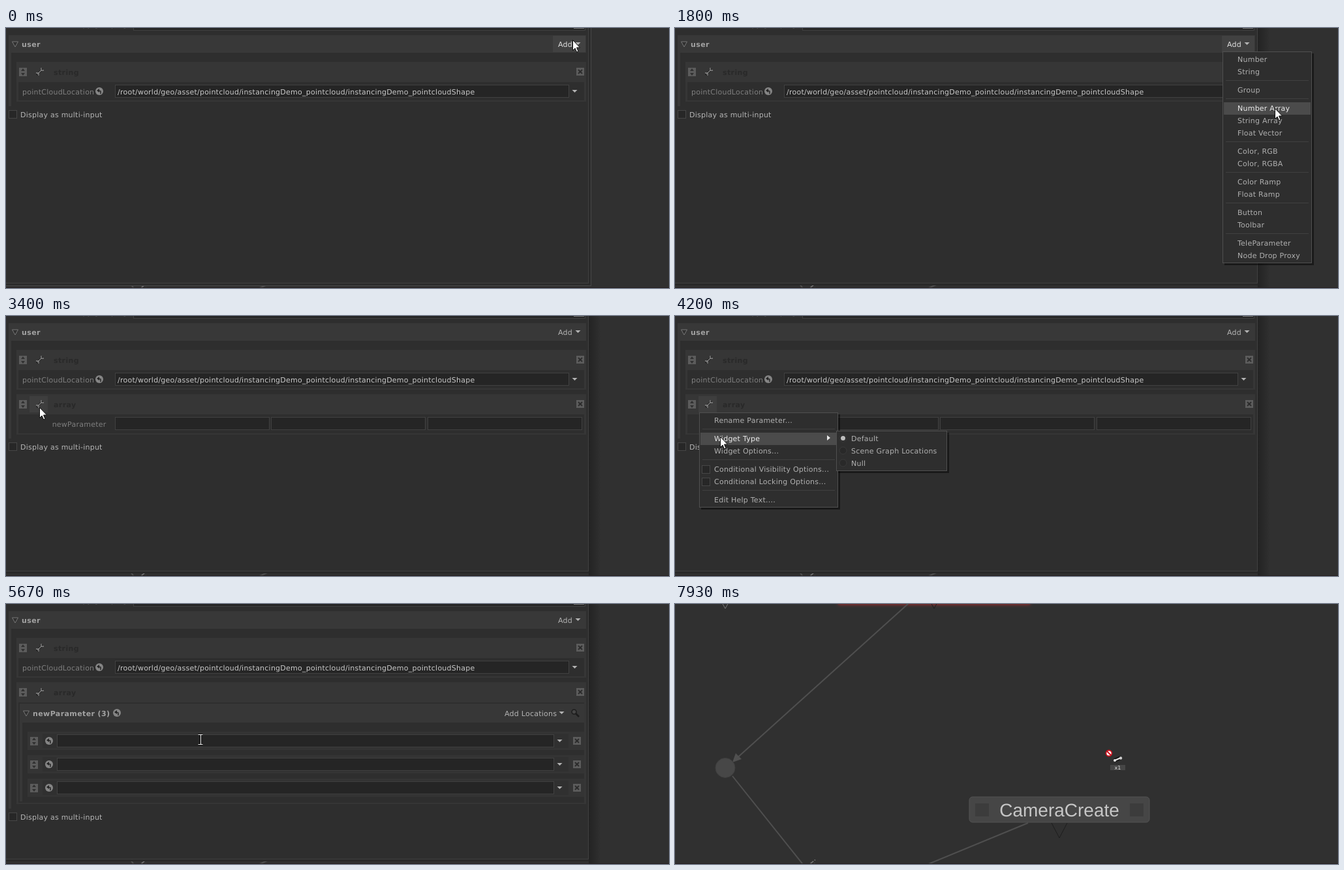
These frames come from a looping animation (1016x399 px, 8000 ms). An HTML page with a canvas:

```html
<!DOCTYPE html>
<html>
<head>
<meta charset="utf-8">
<style>
  html, body { margin: 0; overflow: hidden; background: #303030; }
  canvas { display: block; }
</style>
</head>
<body>
<canvas id="stage" width="1016" height="399"></canvas>
<script>
const ctx = document.getElementById('stage').getContext('2d');
const LOOP = 8000, FPS = 15;

// Moments of the story, in ticks of 1/15 s
const ADD_MENU = 17, ADDED = 37, WRENCH_MENU = 54, SUBMENU = 62,
      CHOSEN = 77, LIST = 79, LEAVE = 99, GRAPH = 115;

// Pointer path: tick, x, y
const PATH = [
  [2, 868, 18], [6, 777, 27], [9, 777, 27], [12, 830, 20], [14, 862, 26], [19, 862, 26],
  [23, 890, 70], [27, 919, 123], [29, 909, 145], [32, 909, 147], [39, 909, 147],
  [43, 600, 160], [49, 55, 143], [51, 51, 140], [54, 51, 140], [58, 58, 165],
  [62, 69, 183], [63, 69, 185], [65, 69, 185], [71, 262, 190], [74, 300, 206], [84, 300, 206],
  [85, 298, 208], [88, 440, 206], [91, 800, 190], [93, 970, 235], [94, 984, 270],
  [95, 960, 293], [97, 847, 285], [98, 749, 238]
];
const DRAG = [[116, 560, -30], [119, 665, 229]];

const ADD_ITEMS = ['Number', 'String', '-', 'Group', '-', 'Number Array', 'String Array',
  'Float Vector', '-', 'Color, RGB', 'Color, RGBA', '-', 'Color Ramp', 'Float Ramp', '-',
  'Button', 'Toolbar', '-', 'TeleParameter', 'Node Drop Proxy'];
const WRENCH_ITEMS = ['Rename Parameter...', '-', 'Widget Type', 'Widget Options...', '-',
  'Conditional Visibility Options...', 'Conditional Locking Options...', '-', 'Edit Help Text....'];
const TYPE_ITEMS = ['Default', 'Scene Graph Locations', 'Null'];

function along(path, k) {
  const i = path.findIndex(p => p[0] >= k);
  if (i === 0) return path[0].slice(1);
  if (i < 0) return path[path.length - 1].slice(1);
  const [a, b] = [path[i - 1], path[i]], u = (k - a[0]) / (b[0] - a[0]);
  return [a[1] + (b[1] - a[1]) * u, a[2] + (b[2] - a[2]) * u].map(Math.round);
}

function box(x, y, w, h, fill, line) {
  ctx.fillStyle = fill;
  ctx.fillRect(x, y, w, h);
  if (line) {
    ctx.strokeStyle = line;
    ctx.lineWidth = 1;
    ctx.strokeRect(x + .5, y + .5, w - 1, h - 1);
  }
}

function poly(points, fill, line, width = 1) {
  ctx.beginPath();
  points.forEach(([x, y]) => ctx.lineTo(x, y));
  if (fill) { ctx.closePath(); ctx.fillStyle = fill; ctx.fill(); }
  if (line) { ctx.strokeStyle = line; ctx.lineWidth = width; ctx.stroke(); }
}

function disc(x, y, r, fill, line, width = 1) {
  ctx.beginPath();
  ctx.arc(x, y, r, 0, 7);
  ctx.fillStyle = fill;
  ctx.fill();
  if (line) { ctx.strokeStyle = line; ctx.lineWidth = width; ctx.stroke(); }
}

function text(s, x, y, color = '#b4b4b4', bold = false, align = 'left') {
  ctx.font = (bold ? 'bold ' : '') + '11px "DejaVu Sans", sans-serif';
  ctx.textRendering = 'geometricPrecision';
  ctx.letterSpacing = bold ? '.4px' : '.24px';
  ctx.textAlign = align;
  ctx.fillStyle = color;
  ctx.fillText(s, x, y + 4);
}

const down = (x, y, r = 4, fill = '#b4b4b4') => poly([[x - r, y - r / 2], [x + r, y - r / 2], [x, y + r / 2]], fill);
const fold = (x, y) => poly([[x - 4.5, y - 4], [x + 4.5, y - 4], [x, y + 4]], '#303030', '#777');
const field = (x, y, w) => box(x, y, w, 20, '#252525', '#414141');

function sorter(x, y) {
  box(x - 6, y - 6, 12, 13, '#5c5c5c');
  poly([[x - 3, y - 1], [x + 3, y - 1], [x, y - 5]], '#303030');
  poly([[x - 3, y + 2], [x + 3, y + 2], [x, y + 6]], '#303030');
}

function closer(x, y) {
  box(x - 6, y - 6, 12, 12, '#5c5c5c');
  poly([[x - 3, y - 3], [x + 3, y + 3]], 0, '#2c2c2c', 2);
  poly([[x + 3, y - 3], [x - 3, y + 3]], 0, '#2c2c2c', 2);
}

function revert(x, y) {
  disc(x, y, 6, '#858585');
  poly([[x - 4, y - 1], [x, y - 4], [x, y + 2]], '#252525');
  poly([[x - 1, y - 1], [x + 2, y], [x + 2, y + 4]], 0, '#252525', 1.5);
}

function wrench(x, y) {
  poly([[x - 5, y + 5], [x + 4, y - 4]], 0, '#1d1d1d', 3);
  poly([[x - 4, y + 4], [x + 3, y - 3]], 0, '#858585', 1.3);
  poly([[x + 2, y - 6], [x + 2, y - 2], [x + 6, y - 2]], 0, '#858585', 1.3);
  poly([[x - 6, y + 2], [x - 2, y + 2], [x - 2, y + 6]], 0, '#858585', 1.3);
}

function panel(y, h, type, lit) {
  box(16, y, 873, h, '#363636');
  box(19, y + 31, 867, h - 33, '#2e2e2e');
  if (lit) box(36, y + 3, 28, 25, '#3e3e3e');
  sorter(26, y + 15);
  wrench(52, y + 15);
  text(type, 73, y + 16, '#292929', true);
  closer(880, y + 15);
}

function graph() {
  box(0, 0, 1016, 399, '#303030');
  ctx.save();
  ctx.shadowColor = '#a02c2c';
  ctx.shadowBlur = 5;
  box(250, -8, 294, 9, '#6d2b2b');
  ctx.restore();
  for (const x of [77, 397]) poly([[x - 5, -2], [x, 7], [x + 5, -2]], 0, x < 100 ? '#777' : '#1d1d1d');
  poly([[358, -1], [92, 239]], 0, '#4f4f4f', 2);
  poly([[88, 243], [93, 229], [102, 238]], '#505050');
  poly([[88, 264], [198, 402]], 0, '#4f4f4f', 2);
  poly([[541, 336], [386, 400]], 0, '#4f4f4f', 2);
  disc(77, 251.5, 15, '#474747', '#3f3f3f');
  ctx.save();
  ctx.translate(199, 400);
  ctx.rotate(.9);
  ctx.font = '18px "Liberation Sans", sans-serif';
  ctx.textAlign = 'left';
  ctx.fillStyle = '#757575';
  ctx.fillText('in', 2, -4);
  ctx.restore();
  poly([[577, 336], [589, 359], [601, 336]], 0, '#1d1d1d');
  ctx.beginPath();
  ctx.roundRect(451, 296, 276, 39, 5);
  ctx.fillStyle = '#464646';
  ctx.fill();
  ctx.strokeStyle = '#525252';
  ctx.stroke();
  box(460, 306, 21, 20, '#3c3c3c');
  box(697, 306, 21, 20, '#3c3c3c');
  ctx.font = '28px "Liberation Sans", sans-serif';
  ctx.letterSpacing = '0px';
  ctx.textAlign = 'center';
  ctx.fillStyle = '#c6c6c6';
  ctx.fillText('CameraCreate', 589, 326);
  box(0, 398, 1016, 1, '#251f20');
}

function windowFrame(focused) {
  if (focused) {
    box(0, 0, 897, 396, '#2b2b2b');
    box(896, 0, 1, 396, '#484848');
    box(0, 395, 897, 1, '#484848');
  } else {
    const shade = ctx.createLinearGradient(893, 0, 912, 0);
    shade.addColorStop(0, '#232323');
    shade.addColorStop(1, '#303030');
    box(893, 0, 19, 398, shade);
    box(0, 392, 893, 3, '#292929');
  }
  box(0, 0, 893, 392, '#2e2e2e');
  box(892, 0, 1, 392, '#404040');
  box(0, 391, 893, 1, '#404040');
}

function properties(k, x, y) {
  const end = k < ADDED + 1 ? 120 : k < LIST ? 188 : 314;
  const addOpen = k >= ADD_MENU && k < ADDED;
  const addLit = addOpen || (x > 838 && x < 889 && y > 11 && y < 38);

  text('for copy grouping:', 190, -6, '#a0a0a0', false, 'right');
  box(195, -10, 693, 14, '#252525', '#414141');
  box(870, 0, 16, 1, '#777');

  box(4, 11, 885, 27, '#383838');
  box(4, 38, 4, end - 38, '#383838');
  if (addLit) box(838, 12, 50, 25, '#414141');
  fold(14, 25);
  text('user', 24, 25, '#a2a2a2', true);
  text('Add', 846, 25, addLit ? '#e0e0e0' : '#b4b4b4');
  down(876.5, 24);

  panel(52, 61, 'string');
  text('pointCloudLocation', 25, 98, '#7e7e7e');
  revert(143, 97);
  field(167, 87, 696);
  text('/root/world/geo/asset/pointcloud/instancingDemo_pointcloud/instancingDemo_pointcloudShape', 171, 98, '#c8c8c8');
  down(871.5, 97);

  if (k >= LIST) locationList();
  else if (k > ADDED) {
    panel(120, 62, 'array', k >= 49);
    text('newParameter', 153.5, 166, '#7e7e7e', false, 'right');
    for (const fx of [167, 406, 646]) field(fx, 155, 237);
  }
  box(4, end + 6, 13, 13, '#272727', '#464646');
  text('Display as multi-input', 22, end + 13);
}

function locationList() {
  panel(120, 187, 'array');
  box(21, 153, 865, 29, '#373737');
  box(21, 182, 4, 121, '#373737');
  fold(31, 168);
  text('newParameter (3)', 41, 168, '#a2a2a2', true);
  revert(170, 167);
  text('Add Locations', 764, 168);
  down(851.5, 167);
  poly([[873, 168], [878, 173]], 0, '#1d1d1d', 2.5);
  disc(870.5, 165.5, 3.5, '#454545', '#1d1d1d', 1.5);
  for (let y = 210; y < 300; y += 36) {
    box(33, y - 14, 853, 28, '#343434');
    box(56, y - 11, 806, 22, '#303030');
    sorter(43, y);
    revert(66, y);
    field(78, y - 10, 762);
    down(848.5, y);
    closer(875, y);
  }
}

// Returns nothing; the row under (px, py) is highlighted
function menu(items, x, y, w, h, px, py, alpha, decorate) {
  ctx.save();
  ctx.globalAlpha = Math.min(1, alpha);
  box(x + 3, y + 3, w, h, 'rgba(0,0,0,.45)');
  box(x, y, w, h, '#2e2e2e', '#505050');
  let top = y + 2;
  for (const item of items) {
    if (item === '-') {
      box(x + 5, top + 4, w - 10, 1, '#404040');
      top += 9;
      continue;
    }
    const mid = top + 10, lit = px > x && px < x + w && py >= top && py < top + 19;
    if (lit) box(x + 2, top + 1, w - 4, 19, '#4b4b4b');
    text(item, x + 23, mid, lit ? '#ececec' : '#b0b0b0');
    if (decorate) decorate(item, mid);
    top += 19;
  }
  ctx.restore();
}

function menus(k, x, y) {
  if (k >= ADD_MENU && k < ADDED)
    menu(ADD_ITEMS, 839, 36, 137, 325, x, y > 37 ? y : -1, (k - ADD_MENU + 1) / 2);
  if (k < WRENCH_MENU || k >= CHOSEN + 1) return;
  const inSub = x > 247;
  menu(WRENCH_ITEMS, 37, 148, 213, 146, inSub ? 60 : x, inSub ? 188 : y, (k - WRENCH_MENU + 1) / 2, (item, mid) => {
    if (item.startsWith('Cond')) box(41, mid - 6, 13, 13, '#272727', '#464646');
    if (item === 'Widget Type') poly([[233, mid - 5], [238, mid - 1], [233, mid + 3]], '#e8e8e8');
  });
  if (k >= SUBMENU)
    menu(TYPE_ITEMS, 247, 176, 170, 62, x, y, (k - SUBMENU + 1) / 2, (item, mid) => {
      disc(257.5, mid - .5, 5.5, '#292929', '#3c3c3c');
      if (item === 'Default') disc(257.5, mid - .5, 3.5, '#bdbdbd');
    });
}

function pointer(k, x, y) {
  const overField = k >= LIST && x > 78 && x < 840 && [210, 246, 282].some(m => Math.abs(y - m) <= 10);
  ctx.save();
  ctx.translate(x, y);
  if (overField) {
    for (const [c, w] of [['#111', 3], ['#f4f4f4', 1]]) {
      poly([[-3.5, -7.5], [3.5, -7.5]], 0, c, w);
      poly([[.5, -7.5], [.5, 7.5]], 0, c, w);
      poly([[-3.5, 7.5], [3.5, 7.5]], 0, c, w);
    }
  } else {
    poly([[.5, .5], [.5, 16.5], [4, 13], [6.7, 19], [9, 18], [6.5, 12], [11.5, 12], [.5, .5]], '#fff', '#111');
  }
  ctx.restore();
}

function dragged(x, y) {
  ctx.save();
  ctx.translate(x, y);
  poly([[8, 11], [18, 7]], 0, '#161616', 6);
  poly([[9, 11], [18, 7]], 0, '#e4e4e4', 2);
  disc(9, 11, 2, '#e4e4e4');
  disc(18, 7.5, 2.2, '#d0d0d0');
  box(2, 18, 23, 8, '#464646');
  ctx.font = '8px "DejaVu Sans", sans-serif';
  ctx.letterSpacing = '0px';
  ctx.textAlign = 'center';
  ctx.fillStyle = '#e0e0e0';
  ctx.fillText('x1', 13.5, 25);
  disc(0, 0, 4.5, '#fff', '#c8101c', 1.8);
  poly([[-3, -3], [3, 3]], 0, '#c8101c', 1.8);
  ctx.restore();
}

function draw() {
  const ms = performance.now() % LOOP;
  const k = Math.floor((ms + 5) * FPS / 1000) % 120;
  graph();
  if (k >= GRAPH) {
    dragged(...along(DRAG, k));
  } else {
    const [x, y] = along(PATH, k);
    windowFrame(k < ADD_MENU);
    properties(k, x, y);
    menus(k, x, y);
    if (k < LEAVE) pointer(k, x, y);
  }
  requestAnimationFrame(draw);
}
draw();
</script>
</body>
</html>
```
